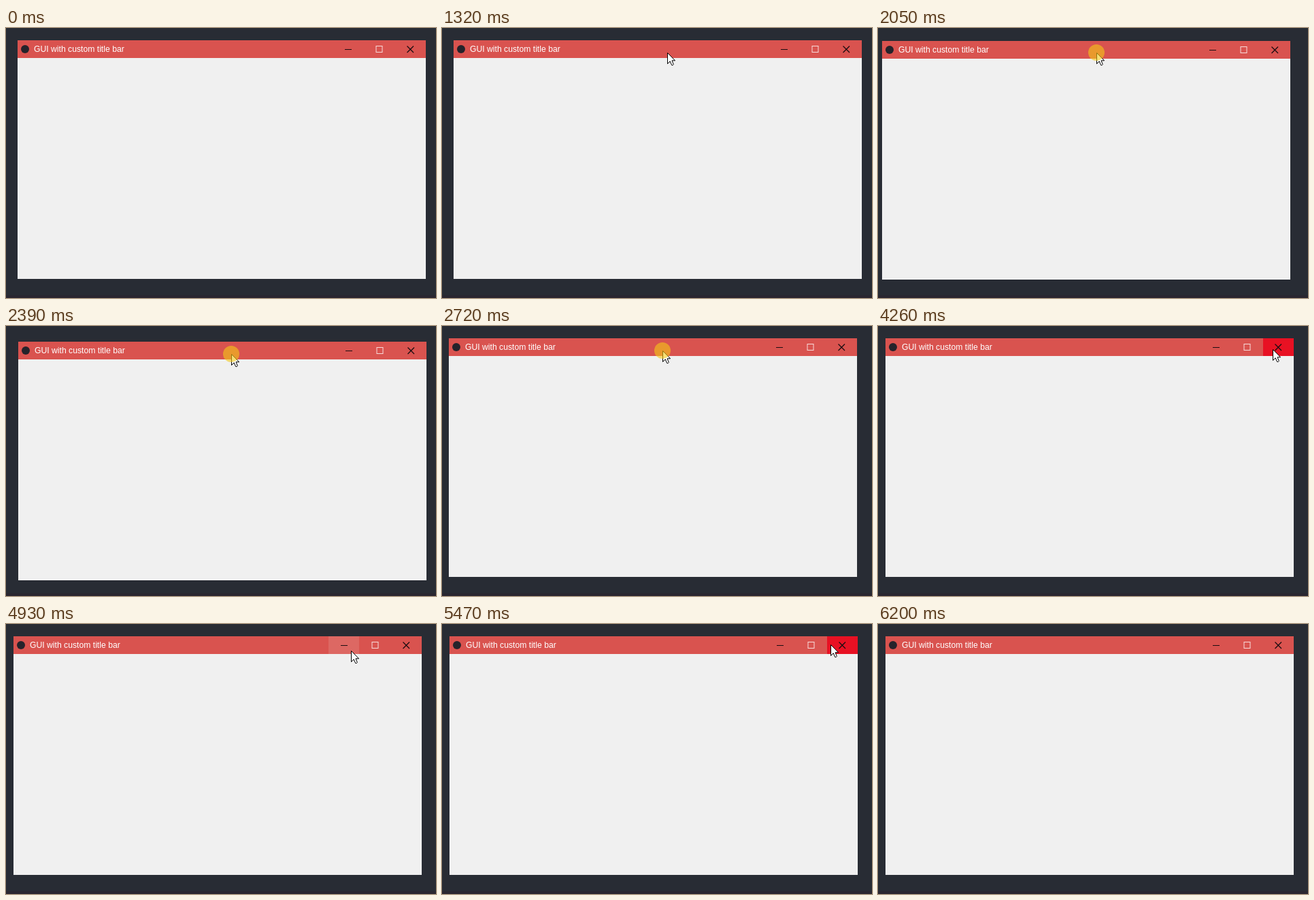
Recreate the animation shown at these times as an HTML page. Size 632x396 px, loop 6.81 s.

```html
<!DOCTYPE html>
<html lang="en">
<head>
<meta charset="utf-8">
<title>Custom title bar</title>
<style>
  html, body { margin: 0; width: 100%; height: 100%; overflow: hidden; background: #282c34; }
  svg { display: block; width: 632px; height: 396px; }
  text { font: 12.2px "Liberation Sans", Arial, sans-serif; fill: #fff; }
  .glyph { fill: none; stroke: #1c0d11; }
</style>
</head>
<body>
<svg viewBox="0 0 632 396">
  <rect width="632" height="396" fill="#282c34"/>
  <rect y="392" width="632" height="4" fill="#2a2630"/>
  <g id="window">
    <rect width="600" height="350" fill="#f0f0f0"/>
    <rect width="600" height="26" fill="#d9534f"/>
    <rect id="hover" width="45" height="26"/>
    <circle cx="11" cy="13" r="6" fill="#25232b"/>
    <text x="24" y="17">GUI with custom title bar</text>
    <path class="glyph" d="M481 13.5h10"/>
    <rect class="glyph" x="527" y="8.5" width="9" height="9" style="stroke:#f8dcdb"/>
    <path class="glyph" d="M572.5 8.5l9.5 9.5m0-9.5l-9.5 9.5" stroke-width="1.3"/>
  </g>
  <path id="cursor" d="M.5.5V16.5L4.2 12.8 6.7 18.5H8.3L9.3 17.3 7 11.8H11.6Z" fill="#fff" stroke="#000"/>
  <circle id="press" r="12" fill="rgb(243,200,24)" fill-opacity=".6"/>
</svg>
<script>
const LOOP = 6810, START = 975, TICK = 66.9;
const PRESS = 10, DRAG = 12, SETTLE = 22, DROP = 27, RELEASE = 29, LEAVE = 78;
const BAR_HEIGHT = 26, BUTTON_X = 463, BUTTON_STEP = 46;
const GRAB = [314, 18];

// Pointer glides: first tick, last tick, destination.
const enterFrom = [524, 328];
const glides = [
  [0, 5, [331, 36]],
  [DRAG, DROP, [325, 36]],
  [30, 38, [502, 40]],
  [40, 44, [548, 38]],
  [44, 47, [582, 59]],
  [47, 49, [580, 34]],
  [51, 62, [500, 40]],
  [62, 67, [571, 30]],
  [67, 77, [479, 372]]
];

const [win, hover, cursor, press] =
  ["window", "hover", "cursor", "press"].map(id => document.getElementById(id));

const easeOut = f => Math.sin(Math.min(f, 1) * Math.PI / 2);
const mix = (a, b, f) => a.map((v, i) => v + (b[i] - v) * f);

function orbit(n) {
  const angle = (200 + 40 * (n - 16)) * Math.PI / 180;
  return [12.6 + 7.5 * Math.cos(angle), 20 + 4 * Math.sin(angle)];
}

function windowAt(n) {
  if (n < DRAG) return [17, 18];
  if (n >= DROP) return [11, 18];
  return mix(orbit(Math.min(n, SETTLE)), [10, 18], easeOut((n - SETTLE) / 4) * (n > SETTLE));
}

function cursorAt(n) {
  // The pointer runs slightly ahead of the dragged window.
  if (n >= DRAG && n < DROP) return windowAt(Math.min(n + 0.4, DROP - 1)).map((v, i) => v + GRAB[i]);
  let point = enterFrom;
  for (const [from, to, target] of glides) {
    if (n < from) break;
    point = mix(point, target, easeOut((n - from) / (to - from)));
  }
  return point;
}

function place(node, [x, y]) {
  node.setAttribute("transform", `translate(${x} ${y})`);
}

function show(node, visible) {
  node.setAttribute("visibility", visible ? "visible" : "hidden");
}

function draw(now) {
  const n = Math.floor((now % LOOP - START) / TICK);
  const frame = windowAt(n).map(Math.round);
  const point = cursorAt(n).map(Math.round);
  const present = n >= 0 && n < LEAVE;
  const button = Math.floor((point[0] - frame[0] - BUTTON_X) / BUTTON_STEP);
  const inBar = point[1] >= frame[1] && point[1] < frame[1] + BAR_HEIGHT;

  place(win, frame);
  place(cursor, point);
  place(press, point);
  show(cursor, present);
  show(press, n >= PRESS && n < RELEASE);
  show(hover, present && inBar && button >= 0 && button < 3);
  hover.setAttribute("x", BUTTON_X + button * BUTTON_STEP);
  hover.setAttribute("fill", button === 2 ? "#e81123" : "#dd6863");
}

const origin = performance.now();
function loop() {
  draw(performance.now() - origin);
  requestAnimationFrame(loop);
}
loop();
</script>
</body>
</html>
```
